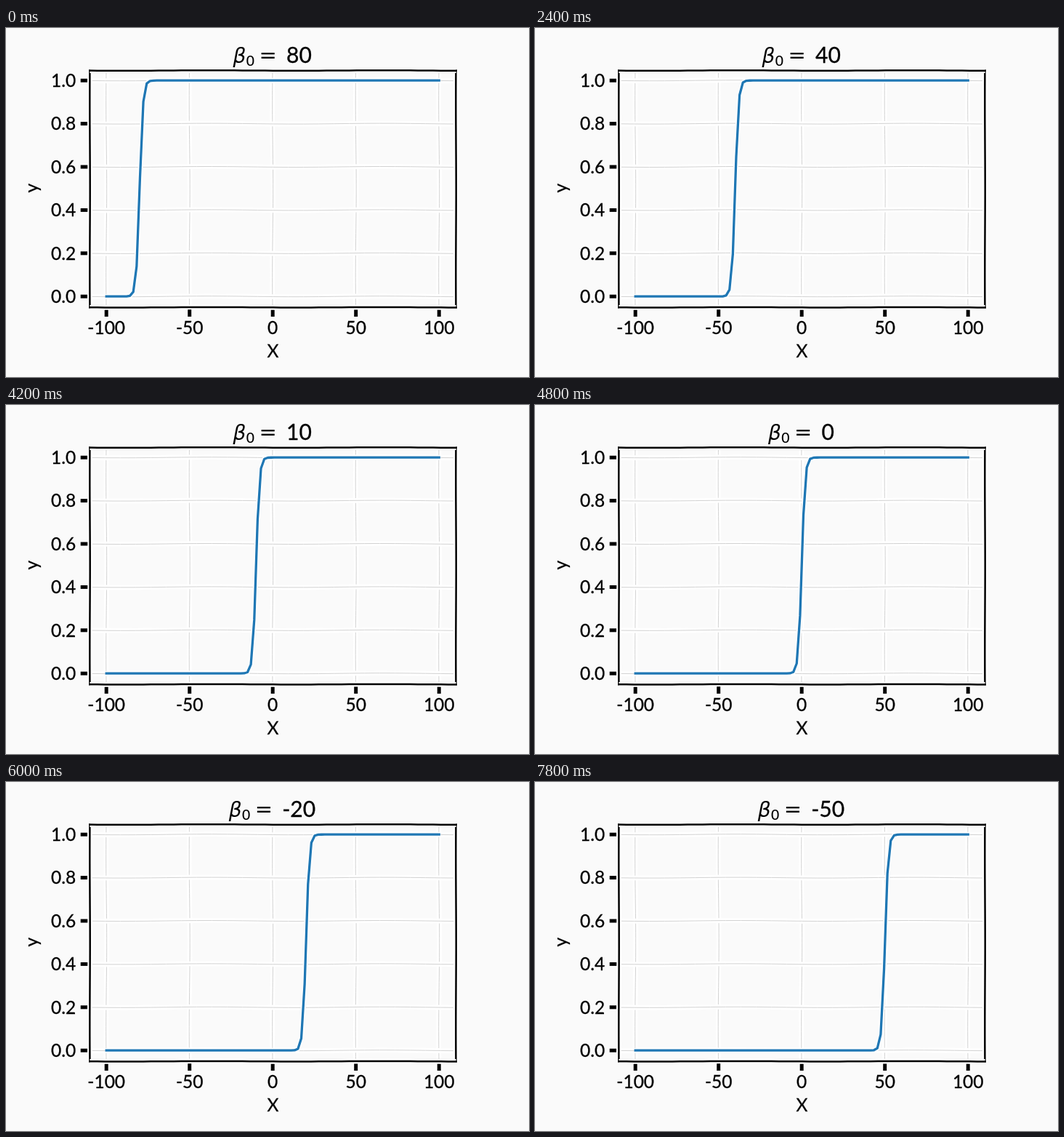
Write an HTML page that moves like this. It is 720 px wide and 480 px high and loops after 8 s.

```html
<!DOCTYPE html>
<html lang="en">
<head>
<meta charset="utf-8">
<title>Logistic curve</title>
<style>
  html, body { margin: 0; width: 100%; height: 100%; overflow: hidden; background: #fafafa; }
  svg { display: block; width: 720px; height: 480px; }
  path { fill: none; stroke-linejoin: round; }
  .halo { stroke: #fff; stroke-width: 6.7; }
  .grid { stroke: #d2d2d2; stroke-width: 1; }
  .tick { stroke: #000; stroke-width: 5; }
  .spine { stroke: #000; stroke-width: 2.5; stroke-linecap: square; }
  .curve { stroke: #1f77b4; stroke-width: 3.3; stroke-linecap: square; }
  text { font: 24.5px Lato, sans-serif; stroke: #000; stroke-width: .3; white-space: pre; }
  .title text { font-size: 30px; }
  .title .math { font: 29px "DejaVu Sans", sans-serif; stroke: none; }
  .title .beta { font-style: italic; font-size: 28px; }
  .title .sub { font-size: 20px; }
</style>
</head>
<body>
<svg id="stage" viewBox="0 0 720 480"></svg>
<script>
const STEP = 600, LOOP = 8000;
const LEFT = 115.5, RIGHT = 619.5, TOP = 58.5, BOTTOM = 384.2;
const px = x => 367.2 + 2.29 * x;
const py = y => 369.2 - 297 * y;
const stage = document.getElementById("stage");

function add(tag, attrs, parent = stage) {
  const el = document.createElementNS("http://www.w3.org/2000/svg", tag);
  for (const key in attrs) el.setAttribute(key, attrs[key]);
  return parent.appendChild(el);
}

function label(content, attrs, parent) {
  const el = add("text", attrs, parent);
  el.textContent = content;
  return el;
}

// A line with a white halo that cuts whatever lies below it
function stroke(cls, d) {
  return [add("path", { class: "halo", d }), add("path", { class: cls, d })];
}

const toPath = points => "M" + points.map(p => p.map(v => v.toFixed(2)).join()).join("L");

// Slightly wavy, hand-drawn straight line
function wavy(x1, y1, x2, y2, amp) {
  const length = Math.hypot(x2 - x1, y2 - y1);
  const points = [];
  for (let i = 0; i <= 48; i++) {
    const k = i / 48;
    const w = amp * Math.sin(k * length / 38 + .4);
    points.push([
      x1 + (x2 - x1) * k + w * (y2 - y1) / length,
      y1 + (y2 - y1) * k + w * (x2 - x1) / length
    ]);
  }
  return toPath(points);
}

for (const x of [-100, -50, 0, 50, 100]) {
  stroke("grid", wavy(px(x), BOTTOM, px(x), TOP, .5));
  stroke("tick", `M${px(x)},${BOTTOM}V397`);
  label(x, { x: px(x), y: 421, "text-anchor": "middle" });
}
for (let i = 0; i <= 5; i++) {
  const y = py(i / 5);
  stroke("grid", wavy(LEFT, y, RIGHT, y, .5));
  stroke("tick", `M${LEFT},${y}H102.7`);
  label((i / 5).toFixed(1), { x: 96.3, y: y + 8.8, "text-anchor": "end" });
}

const curve = stroke("curve", "");

stroke("spine", wavy(LEFT, BOTTOM, LEFT, TOP, .2));
stroke("spine", wavy(RIGHT, BOTTOM, RIGHT, TOP, .2));
stroke("spine", wavy(LEFT, BOTTOM, RIGHT, BOTTOM, .25));
stroke("spine", wavy(LEFT, TOP, RIGHT, TOP, .25));

label("X", { x: 367.5, y: 452.5, "text-anchor": "middle" });
label("y", { transform: "translate(44.3 220.3) rotate(-90)", "text-anchor": "middle" });

const title = add("g", { class: "title" });
label("β", { class: "math beta", x: 312.5, y: 47.5 }, title);
label("0", { class: "math sub", x: 330, y: 52.3 }, title);
label("=", { class: "math", x: 348.6, y: 47.3 }, title);
const value = label("", { x: 386, y: 48 }, title);

const titleShift = { 1: 8.4, 2: 0, 3: -5.8 };
let shown = null;

function show(beta) {
  if (beta === shown) return;
  shown = beta;
  const points = Array.from({ length: 100 }, (_, i) => {
    const x = -100 + 200 * i / 99;
    return [px(x), py(1 / (1 + Math.exp(-x - beta)))];
  });
  curve.forEach(p => p.setAttribute("d", toPath(points)));
  value.textContent = beta;
  title.setAttribute("transform", `translate(${titleShift[String(beta).length]} 0)`);
}

const start = performance.now();
function tick(now) {
  const t = Math.max(0, now - start) % LOOP;
  show(80 - 10 * Math.floor(t / STEP));
  requestAnimationFrame(tick);
}
tick(start);
</script>
</body>
</html>
```
